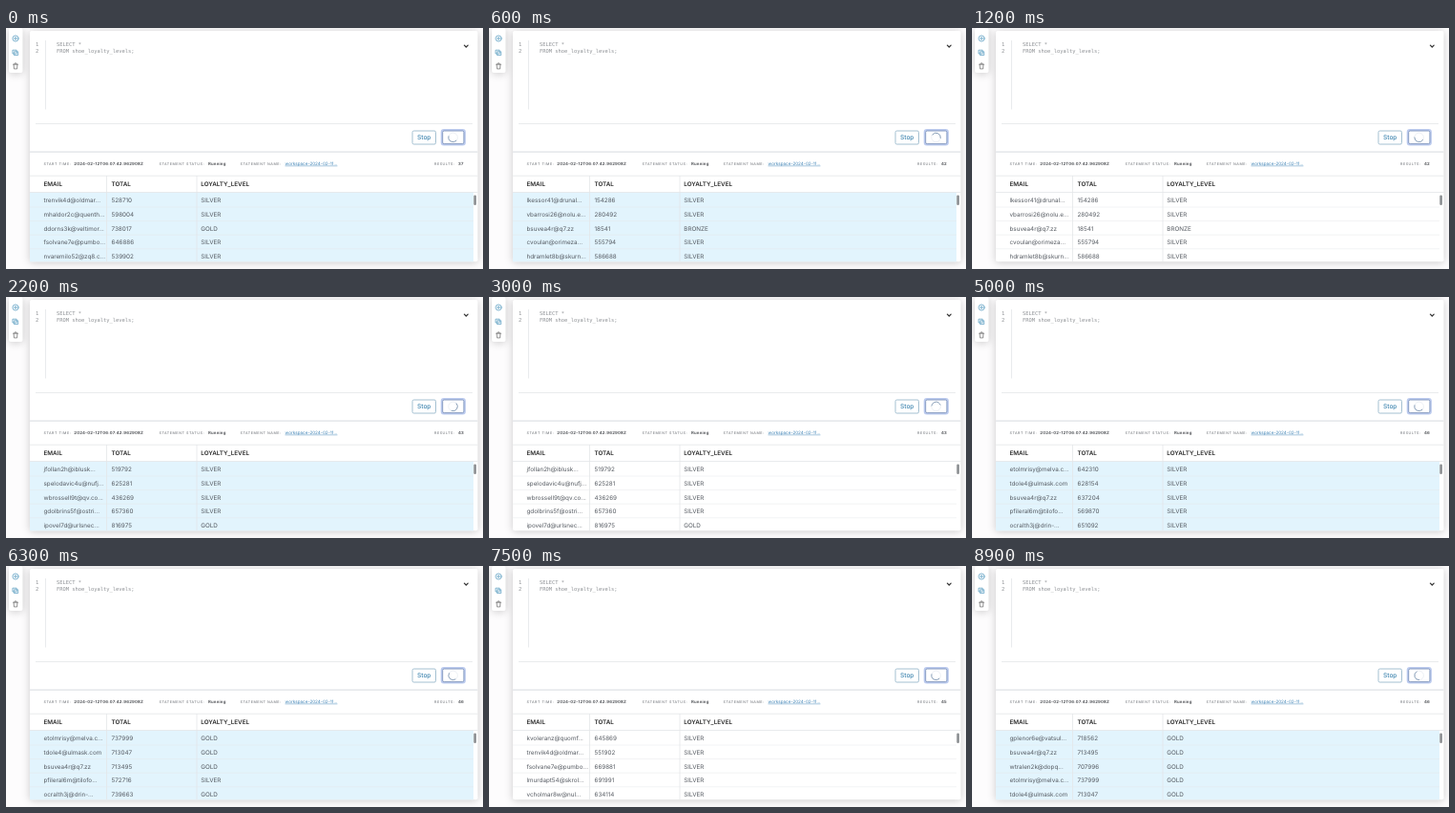
Write an HTML page that moves like this. It is 500 px wide and 253 px high and loops after 9 s.

```html
<!DOCTYPE html>
<html lang="en">
<head>
<meta charset="utf-8">
<title>Streaming query results</title>
<style>
  html, body { margin: 0; width: 100%; height: 100%; overflow: hidden; background: #fdfcfd; }
  svg { display: block; width: 100vw; height: 100vh; }
  text { font: 6.3px Inter, "Liberation Sans", sans-serif; fill: #555a61; white-space: pre; text-rendering: geometricPrecision; }
  .card { fill: #fff; filter: drop-shadow(0 1px 4px #0003); }
  .line { stroke: #e4e6e9; stroke-width: .8; }
  .code text { font: 5.43px "DejaVu Sans Mono", monospace; fill: #8d9094; }
  .head text { font-weight: 600; fill: #2a2a2a; }
  .meta text { font-size: 3.7px; letter-spacing: .55px; fill: #666a70; }
  .meta .value { font-size: 4.3px; font-weight: 600; letter-spacing: .2px; fill: #404348; }
  .meta .link { font-size: 4.6px; letter-spacing: 0; fill: #3d82b5; text-decoration: underline; }
  .icon { fill: none; stroke-width: .8; stroke-linecap: round; stroke-linejoin: round; }
</style>
</head>
<body>
<svg viewBox="0 0 500 253" preserveAspectRatio="none">
  <rect class="card" x="3" y="0" width="14.5" height="47" rx="2"/>
  <g class="icon" stroke="#62a2c4">
    <circle cx="10" cy="11" r="3.1"/>
    <path d="M8.5 11h3M10 9.5v3"/>
    <path d="M7.3 23.2h3.8v3.8h-3.8zM8.8 24.8h3.8v3.8h-3.8z" fill="#fff"/>
    <path stroke="#777" d="M7.5 38.2h5M9 38v-1h2v1M8.1 38.5l.3 4.4h3.2l.3-4.4"/>
  </g>

  <rect class="card" x="25" y="3" width="469.5" height="242.3" rx="2"/>
  <g class="code">
    <text x="31" y="18.7">1</text><text x="53" y="18.7">SELECT *</text>
    <text x="31" y="26.2">2</text><text x="53" y="26.2">FROM shoe_loyalty_levels;</text>
  </g>
  <path class="line" d="M41.5 13V85.5M31 100.5H489"/>
  <path class="icon" stroke="#333" style="stroke-width:1.2" d="M480.4 18.1l1.9 1.9 1.9-1.9"/>

  <rect x="426" y="108" width="24.5" height="14" rx="1.5" fill="#fff" stroke="#8fb0c6" stroke-width=".8"/>
  <text x="438.2" y="117.3" text-anchor="middle" style="font-size:6.6px;font-weight:500;fill:#3b83ae">Stop</text>
  <rect x="457" y="107.3" width="23.6" height="15" rx="2" fill="#fff" stroke="#bccbee" stroke-width="2.6"/>
  <rect x="457.7" y="108" width="22.2" height="13.6" rx="1.5" fill="#fff" stroke="#7189b4" stroke-width=".8"/>
  <circle cx="468.6" cy="114.9" r="4.8" fill="none" stroke="#e9edf2" stroke-width=".8"/>
  <path id="spinner" class="icon" stroke="#7f97b2" d="M473.2 116.2A4.8 4.8 0 0 1 464 116.2"/>

  <rect x="25" y="129.3" width="469.5" height="1.6" fill="#e6e8eb"/>
  <g class="meta">
    <text x="39.5" y="143.5">START TIME:</text>
    <text x="71.3" y="143.7" class="value">2024-02-12T06:07:42.962908Z</text>
    <text x="160.5" y="143.5">STATEMENT STATUS:</text>
    <text x="212" y="143.7" class="value">Running</text>
    <text x="245.5" y="143.5">STATEMENT NAME:</text>
    <text x="292.5" y="143.7" class="link">workspace-2024-02-11...</text>
    <text x="449" y="143.5">RESULTS:</text>
    <text x="474" y="143.7" class="value" id="count"></text>
  </g>

  <rect id="flash" x="25" y="172.5" width="465" height="72.8" fill="#e2f4fd"/>
  <path class="line" d="M25 155.2H494.5M25 172.5H494.5M105.5 155V245M200 155V245"/>
  <g class="head">
    <text x="39.5" y="165.9">EMAIL</text>
    <text x="110.5" y="165.9">TOTAL</text>
    <text x="204.3" y="165.9">LOYALTY_LEVEL</text>
  </g>
  <g id="rows"></g>
  <rect x="490.3" y="175.5" width="2.6" height="10.5" rx="1.2" fill="#8b8e91"/>
</svg>
<script>
const LOOP = 9000, STEP = 100, SPIN = 1250, SPIN_START = 30;
const HOLD = 300, FADE = 400;
const LEVELS = { S: "SILVER", G: "GOLD", B: "BRONZE" };

// Each update: start time, result count, rows of "email total level".
const updates = [
  [0, 37, "trenvik4d@oldmar... 528710 S|mhaldor2c@quenth... 598004 S|ddorns3k@veltimor... 738017 G|fsolvane7e@pumbo... 646886 S|nvaremilo52@zq8.c... 539902 S"],
  [500, 42, "lkessor41@drunal... 154286 S|vbarrosi26@nolu.e... 280492 S|bsuvea4r@q7.zz 18541 B|cvoulan@orimeza... 555794 S|hdramlet8b@skurn... 586688 S"],
  [2000, 43, "jfollan2h@iblusk... 519792 S|spelodavic4u@nufj... 625281 S|wbrossell9t@qv.co... 436269 S|gdolbrins5f@ostri... 657360 S|ipovel7d@urlsnec... 816975 G"],
  [3300, 46, "etolmrisy@melva.c... 545989 S|lkessor41@drunal... 383683 S|bsuvea4r@q7.zz 561071 S|vbarrosi26@nolu.e... 494503 S|pfileral6m@tilofo... 567221 S"],
  [4700, 46, "etolmrisy@melva.c... 642310 S|tdole4@ulmask.com 628154 S|bsuvea4r@q7.zz 637204 S|pfileral6m@tilofo... 569870 S|ocralth3j@drin-... 651092 S"],
  [6100, 46, "etolmrisy@melva.c... 737999 G|tdole4@ulmask.com 713047 G|bsuvea4r@q7.zz 713495 G|pfileral6m@tilofo... 572716 S|ocralth3j@drin-... 739663 G"],
  [6800, 45, "kvoleranz@quomf... 645869 S|trenvik4d@oldmar... 551902 S|fsolvane7e@pumbo... 669881 S|lmurdapt54@skrol... 691991 S|vcholmar8w@nul... 634114 S"],
  [8700, 46, "gplenor6e@vatsul... 718562 G|bsuvea4r@q7.zz 713495 G|wtralen2k@dopq... 707996 G|etolmrisy@melva.c... 737999 G|tdole4@ulmask.com 713047 G"]
];

const $ = id => document.getElementById(id);
let shown;

function showUpdate(update) {
  shown = update;
  $("count").textContent = update[1];
  $("rows").innerHTML = update[2].split("|").map((row, i) => {
    const [email, total, level] = row.split(" ");
    const y = 183.4 + i * 14.6;
    const cell = (x, value) => `<text x="${x}" y="${y}">${value}</text>`;
    const rule = i < 4 ? `<path class="line" d="M25 ${y + 4.6}H490" opacity=".6"/>` : "";
    return rule + cell(39.5, email) + cell(110.5, total) + cell(204.3, LEVELS[level]);
  }).join("");
}

function draw(now) {
  const t = Math.floor((now % LOOP) / STEP) * STEP;
  const update = updates.findLast(u => u[0] <= t);
  if (update !== shown) showUpdate(update);
  const age = t - update[0];
  $("flash").setAttribute("opacity", Math.max(0, Math.min(1, 1 - (age - HOLD) / FADE)));
  $("spinner").setAttribute("transform", `rotate(${SPIN_START + t / SPIN * 360} 468.6 114.9)`);
  requestAnimationFrame(draw);
}
draw(performance.now());
</script>
</body>
</html>
```
